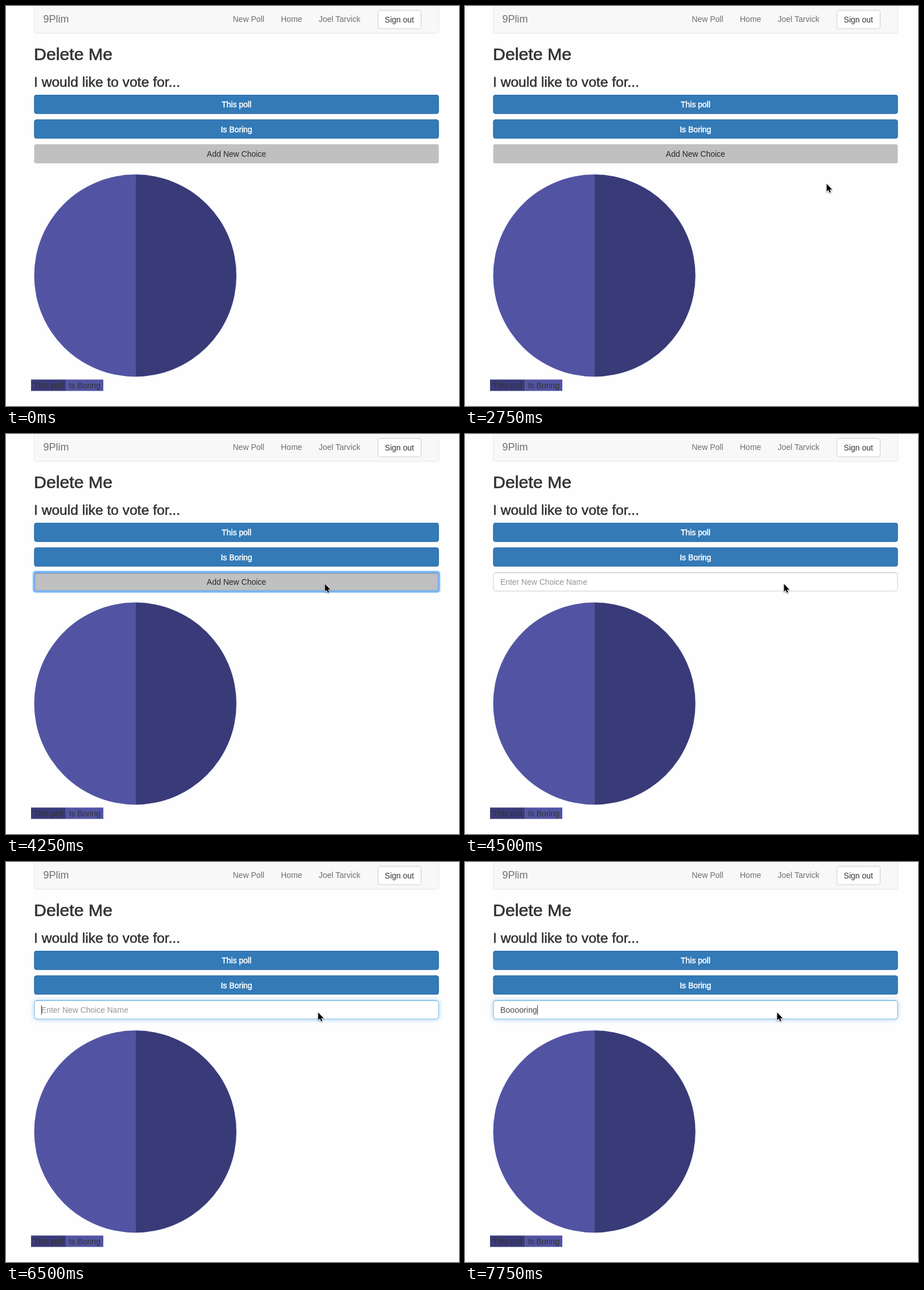
Write an HTML page with a canvas that moves like this. It is 796 px wide and 703 px high and loops after 8 s.

```html
<!DOCTYPE html>
<html lang="en">
<head>
<meta charset="utf-8">
<title>Poll</title>
<style>
html, body { margin: 0; width: 100%; height: 100%; overflow: hidden; background: #fefefe; }
canvas { display: block; }
</style>
</head>
<body>
<canvas id="stage" width="796" height="703"></canvas>
<script>
const ctx = document.getElementById('stage').getContext('2d');
const LOOP = 8000;
const LEFT = 49.5, WIDTH = 711;

// Step lists: [start ms, ...values]
const POINTER = [
  [1250, 776, 318], [1500, 737, 415], [2000, 718, 317], [2250, 705, 303],
  [2500, 703, 303], [2750, 635.5, 312.5], [3000, 596, 273], [3250, 593, 262],
  [4000, 560.5, 263.5], [5250, 548.5, 264.5]
];
const FIELD = [
  [0, 'button'], [4250, 'pressed'], [4500, 'input'], [5500, 'focus']
];
const TYPED = [
  [0, ''], [6750, 'B'], [7000, 'Bo'], [7250, 'Booo'], [7500, 'Boooori'], [7750, 'Booooring']
];

const stepAt = (list, t) => list.filter(s => s[0] <= t).pop();

function box(x, y, w, h, r, fill, border) {
  ctx.beginPath();
  ctx.roundRect(x, y, w, h, r);
  if (fill) {
    ctx.fillStyle = fill;
    ctx.fill();
  }
  if (border) {
    ctx.beginPath();
    ctx.roundRect(x + 0.5, y + 0.5, w - 1, h - 1, r);
    ctx.strokeStyle = border;
    ctx.lineWidth = 1;
    ctx.stroke();
  }
}

function label(text, x, y, { size = 14, color = '#333', align = 'left', bold = 0 } = {}) {
  ctx.font = `${size}px "Liberation Sans", Arial, sans-serif`;
  ctx.textAlign = align;
  ctx.fillStyle = color;
  ctx.fillText(text, x, y);
  if (bold) {
    ctx.strokeStyle = color;
    ctx.lineWidth = bold;
    ctx.strokeText(text, x, y);
  }
}

function drawNav() {
  box(49, -10, 712, 58.5, 4, '#f8f8f8', '#e7e7e7');
  const gray = { color: '#6f6f6f' };
  label('9Plim', 65.5, 29, { size: 18, color: '#6f6f6f' });
  label('New Poll', 398.5, 28, gray);
  label('Home', 483, 28, gray);
  label('Joel Tarvick', 549.5, 28, gray);
  box(653, 7, 77, 33.5, 4, '#fff', '#ccc');
  label('Sign out', 691.3, 29, { align: 'center' });
}

function drawChoice(text, y) {
  box(LEFT, y, WIDTH, 33.5, 4, '#337ab7', '#2e6da4');
  label(text, 405, y + 22, { color: '#fff', align: 'center', bold: 0.5 });
}

function drawAddButton(pressed) {
  box(LEFT, 243, WIDTH, 33.5, 3.5, '#c0c0c0');
  if (pressed) {
    for (const [width, alpha] of [[6, 0.3], [3.2, 0.75]]) {
      ctx.beginPath();
      ctx.roundRect(LEFT - 0.3, 242.7, WIDTH + 0.6, 34.1, 3);
      ctx.lineWidth = width;
      ctx.strokeStyle = `rgba(92,168,246,${alpha})`;
      ctx.stroke();
    }
    ctx.fillStyle = 'rgba(0,0,0,.12)';
    ctx.fillRect(51, 244.5, WIDTH - 3, 1.5);
  }
  label('Add New Choice', 405, 264.5, { color: '#262626', align: 'center' });
}

function drawInput(t, focus) {
  if (focus) {
    ctx.save();
    ctx.shadowColor = 'rgba(102,175,233,.6)';
    ctx.shadowBlur = 8;
    box(LEFT, 243, WIDTH, 33.5, 4, '#fff');
    ctx.restore();
  }
  box(LEFT, 243, WIDTH, 33.5, 4, '#fff', focus ? '#66afe9' : '#ccc');
  ctx.fillStyle = 'rgba(0,0,0,.07)';
  ctx.fillRect(52, 244, WIDTH - 5, 1);

  const typed = stepAt(TYPED, t)[1];
  if (typed) label(typed, 62, 264.5, { size: 14.2, color: '#4c4c4c' });
  else label('Enter New Choice Name', 62, 264.5, { size: 13.9, color: '#959595' });

  const caretOn = focus && !(t >= 6000 && t < 6500);
  if (caretOn) {
    const x = typed ? 62 + Math.round(ctx.measureText(typed).width) : 62;
    ctx.fillStyle = '#333';
    ctx.fillRect(x, 252, 1, 16);
  }
}

function drawPie() {
  const cx = 227.2, cy = 473.8, r = 177.7;
  ctx.fillStyle = '#5254a3';
  ctx.beginPath();
  ctx.arc(cx, cy, r, Math.PI / 2, Math.PI * 1.5);
  ctx.fill();
  ctx.fillStyle = '#393b79';
  ctx.beginPath();
  ctx.arc(cx, cy, r, -Math.PI / 2, Math.PI / 2);
  ctx.fill();

  ctx.fillRect(44, 656.5, 61.7, 20);
  ctx.fillStyle = '#5254a3';
  ctx.fillRect(105.7, 656.5, 65.3, 20);
  label('This poll', 49, 671.5);
  label('Is Boring', 110.7, 671.5);
}

function drawPointer(x, y) {
  const arrow = new Path2D('M0 0V13.6L3.1 10.7L5.2 15.6L7.4 14.7L5.3 9.9H9.7Z');
  ctx.save();
  ctx.translate(x, y);
  ctx.lineJoin = 'round';
  ctx.lineWidth = 1.8;
  ctx.strokeStyle = '#fff';
  ctx.shadowColor = 'rgba(0,0,0,.4)';
  ctx.shadowBlur = 2.5;
  ctx.shadowOffsetY = 1;
  ctx.stroke(arrow);
  ctx.shadowColor = 'transparent';
  ctx.fillStyle = '#000';
  ctx.fill(arrow);
  ctx.restore();
}

function draw(t) {
  ctx.fillStyle = '#fefefe';
  ctx.fillRect(0, 0, 796, 703);
  drawNav();
  label('Delete Me', 49, 95, { size: 30.3, bold: 0.7 });
  label('I would like to vote for...', 49, 142, { size: 24.6, bold: 0.6 });
  drawChoice('This poll', 156);
  drawChoice('Is Boring', 199.5);

  const field = stepAt(FIELD, t)[1];
  if (field === 'button' || field === 'pressed') drawAddButton(field === 'pressed');
  else drawInput(t, field === 'focus');

  drawPie();
  const pointer = stepAt(POINTER, t);
  if (pointer) drawPointer(pointer[1], pointer[2]);
}

const start = performance.now();
function tick() {
  draw((performance.now() - start) % LOOP);
  requestAnimationFrame(tick);
}
tick();
</script>
</body>
</html>
```
